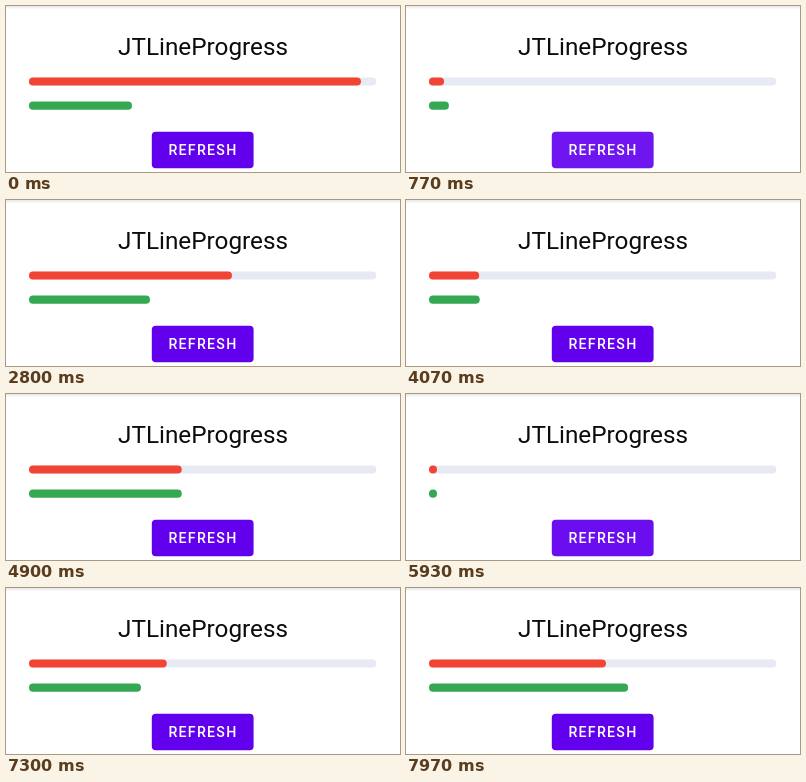
An HTML page for the animation above (8 s loop, 394x166 px).

```html
<!DOCTYPE html>
<html lang="en">
<head>
<meta charset="utf-8">
<title>JTLineProgress</title>
<style>
  html, body { margin: 0; width: 100%; height: 100%; overflow: hidden; background: #fff; }
  svg { display: block; width: 100%; height: 100%; }
  text { font-family: Roboto, sans-serif; }
  .title { font-size: 24.3px; fill: #0c0c0c; text-anchor: middle; }
  .label { font-size: 14.2px; font-weight: 500; letter-spacing: 1.27px; fill: #fff; }
</style>
</head>
<body>
<svg viewBox="0 0 394 166">
  <defs>
    <linearGradient id="shade" x2="0" y2="1">
      <stop offset="0" stop-color="#e6e6e6"/>
      <stop offset="1" stop-color="#fff"/>
    </linearGradient>
  </defs>
  <rect width="394" height="3.5" fill="url(#shade)"/>
  <text class="title" x="197" y="49.2">JTLineProgress</text>
  <rect x="23" y="71.4" width="347.3" height="8.2" rx="4.1" fill="#e7eaf2"/>
  <rect id="red" x="23" y="71.4" height="8.2" rx="4.1" fill="#f24435"/>
  <rect id="green" x="23" y="95.6" height="8.2" rx="4.1" fill="#34a853"/>
  <rect x="145.8" y="125.8" width="101.8" height="36.4" rx="4" fill="#6200ee"/>
  <rect id="ripple" x="145.8" y="125.8" width="101.8" height="36.4" rx="4" fill="#fff" opacity="0"/>
  <text class="label" x="162.4" y="149.3">REFRESH</text>
</svg>
<script>
  const LOOP = 8000;
  const DOT = 8;             // bar length at zero progress
  const MS_PER_PX = 11.8;    // longer bars take proportionally longer

  // Each tap resets both bars to a dot, then they grow to these lengths.
  const runs = [
    { tap: 0, start: -9000, red: 324, green: 95 },
    { tap: 500, start: 490, red: 195, green: 113 },
    { tap: 3430, start: 3400, red: 173, green: 170 },
    { tap: 5930, start: 5945, red: 169, green: 269 }
  ];

  const byId = id => document.getElementById(id);
  const bars = { red: byId('red'), green: byId('green') };
  const ripple = byId('ripple');
  const clamp = v => Math.min(1, Math.max(0, v));
  const ease = v => (1 - Math.cos(Math.PI * clamp(v))) / 2;

  function rippleOpacity(age) {
    return age < 120 ? 0.05 + 0.1 * age / 120 : 0.15 * (1 - clamp((age - 120) / 330));
  }

  function draw(t) {
    const run = runs.filter(r => r.tap <= t).pop();
    for (const name in bars) {
      const grow = run[name];
      const length = DOT + grow * ease((t - run.start) / (grow * MS_PER_PX));
      bars[name].setAttribute('width', length.toFixed(2));
    }
    ripple.setAttribute('opacity', run.tap ? rippleOpacity(t - run.tap) : 0);
  }

  const origin = performance.now();
  function tick() {
    draw((performance.now() - origin) % LOOP);
    requestAnimationFrame(tick);
  }
  tick();
</script>
</body>
</html>
```
